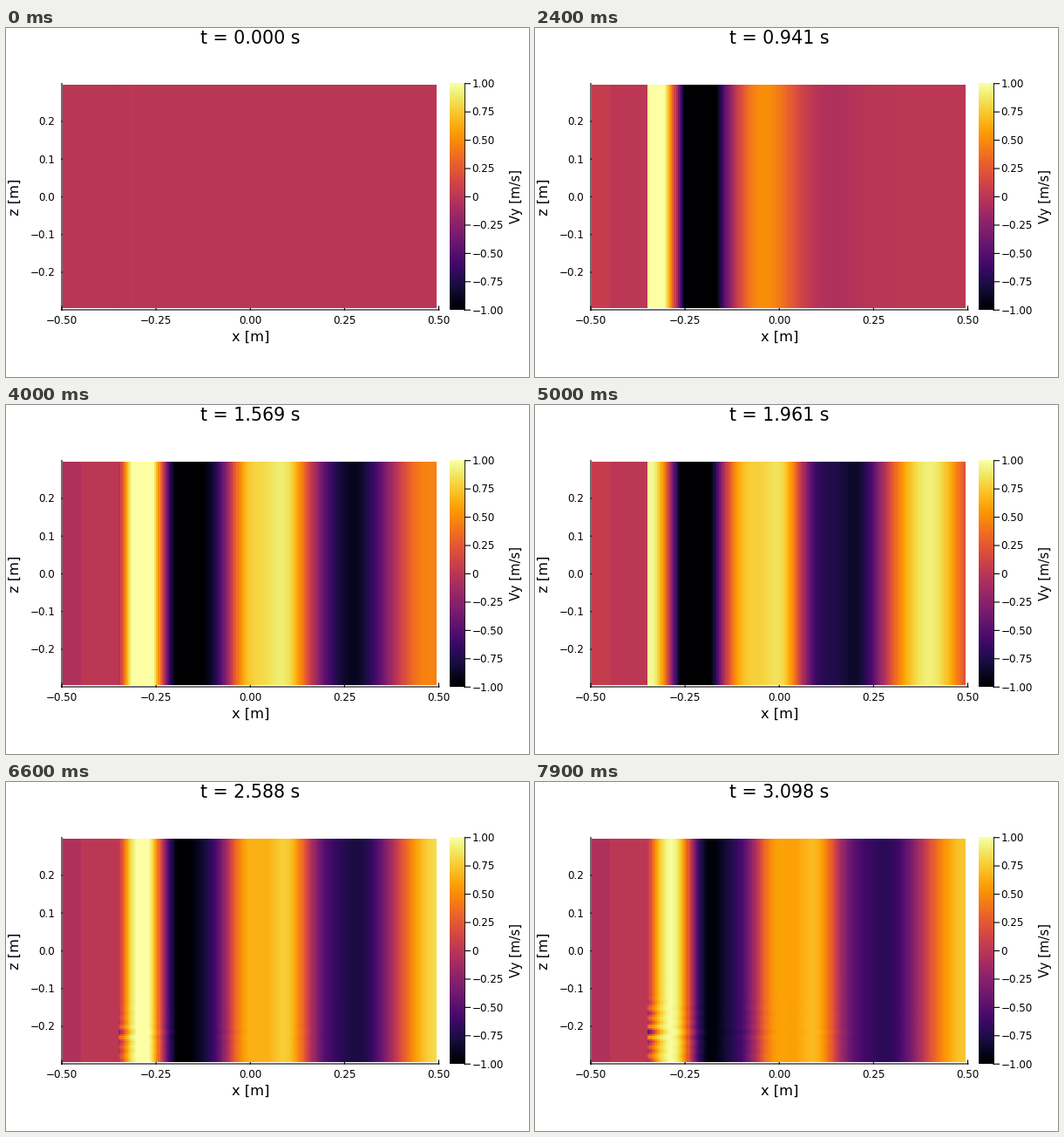
Animation, 600 px wide and 400 px high, one loop 8000 ms. Source, as a matplotlib script:

```python
import matplotlib.pyplot as plt
import numpy as np
from matplotlib.animation import FuncAnimation

STEPS, DT = 80, 2 / 51
COLS, ROWS = 200, 119
PERIOD = .5125
SOURCE = -.35
LEFT, MID, SCALE = 64, 193.5, 432.5  # pixel mapping of x = -0.5, z = 0

x = np.linspace(-.5, .495, COLS)
z = np.linspace(.295, -.295, ROWS)[:, None]


def bump(u, center, width):
    return np.exp(-((u - center) / width) ** 2)


def onset(s, width, power):
    return 1 - np.exp(-(np.maximum(s, 0) / width) ** power)


def ripple(t):
    """Sideways wobble that grows near the bottom."""
    grow = np.clip(t - 2.1, 0, 1)
    env = bump(z, -.24 + .02 * grow, .03 + .035 * grow)
    wave = np.sin(2 * np.pi * z / .026 + .8) + .5 * np.sin(2 * np.pi * z / .041)
    reach = np.exp(-np.abs(x - SOURCE) / .035) + .15 * bump(x, -.05, .25)
    return .014 * grow * env * wave * reach


def field(t):
    """Driven wave that leaves the source and speeds up to the right."""
    pos = x + ripple(t)
    d = pos - SOURCE
    delay = 1.13 * d + .19 * (1 - np.exp(-d / .11))
    s = t - delay + .1 * np.exp(-(t / .9) ** 4)

    theta = 2 * np.pi * (s - .285) / PERIOD
    size = (.95 + .8 * bump(pos, -.23, .07)) * (1.3 - .17 * t)
    third = .2 * bump(pos, .05, .2) * onset(s, .9, 6)
    v = size * onset(s, .5, 3) * (np.sin(theta) + third * np.sin(3 * theta - .35))

    v[:, x < SOURCE - .001] = 0
    v[:, x < -.451] = -.09 * min(1, t / .6) * np.cos(2 * np.pi * (t - 2.655) / PERIOD)
    return v


fig = plt.figure(figsize=(6, 4), dpi=100, facecolor="white")
ax = fig.add_axes([0, 0, 1, 1])
ax.axis("off")


def label(px, py, s, size, **kw):
    return ax.text(px, py, s, fontsize=size * .72, family="DejaVu Sans", **kw)


def line(xs, ys, **kw):
    ax.plot(xs, ys, color="black", lw=.8, zorder=1, snap=False, **kw)


def number(v, digits):
    return f"{v:.{digits}f}".replace("-", "\u2212")


look = dict(cmap="inferno", vmin=-1, vmax=1, aspect="auto", interpolation="nearest", zorder=2)
heat = ax.imshow(field(0), extent=(65, 494, 321, 65.5), **look)
ax.imshow(np.linspace(1, -1, 256)[:, None], extent=(509, 526, 323, 63.5), **look)

line([LEFT, LEFT], [63.5, 323.5])
line([LEFT - .5, 497], [323, 323])
for v in np.linspace(-.5, .5, 5):
    px = LEFT + SCALE * (v + .5)
    line([px, px], [319, 323])
    label(px, 339, number(v, 2), 12, ha="center")
for k in range(-2, 3):
    py = MID - SCALE * k / 10
    line([LEFT, 68.5], [py, py])
    label(56.3, py + 4.3, number(k / 10, 1), 12, ha="right")

line([526.3, 526.3], [63.5, 323.5])
for v in np.linspace(-1, 1, 9):
    py = MID - 129.75 * v
    line([526, 532.5], [py, py])
    label(534.5, py + 4.3, number(v, 2) if v else "0", 12)

label(280.3, 359.2, "x [m]", 16.2, ha="center")
label(10.5, MID, "z [m]", 16.2, rotation=90, ha="center", va="center")
label(585.3, MID - .7, "Vy [m/s]", 14.8, rotation=90, ha="center", va="center")
title = label(280.3, 18.4, "", 20.7, ha="center")
ax.set(xlim=(0, 600), ylim=(400, 0))


def draw(n):
    heat.set_data(field(n * DT))
    title.set_text(f"t = {n * DT:.3f} s")
    return heat, title


anim = FuncAnimation(fig, draw, frames=STEPS, interval=100, repeat=True, repeat_delay=0)
plt.show()
```
